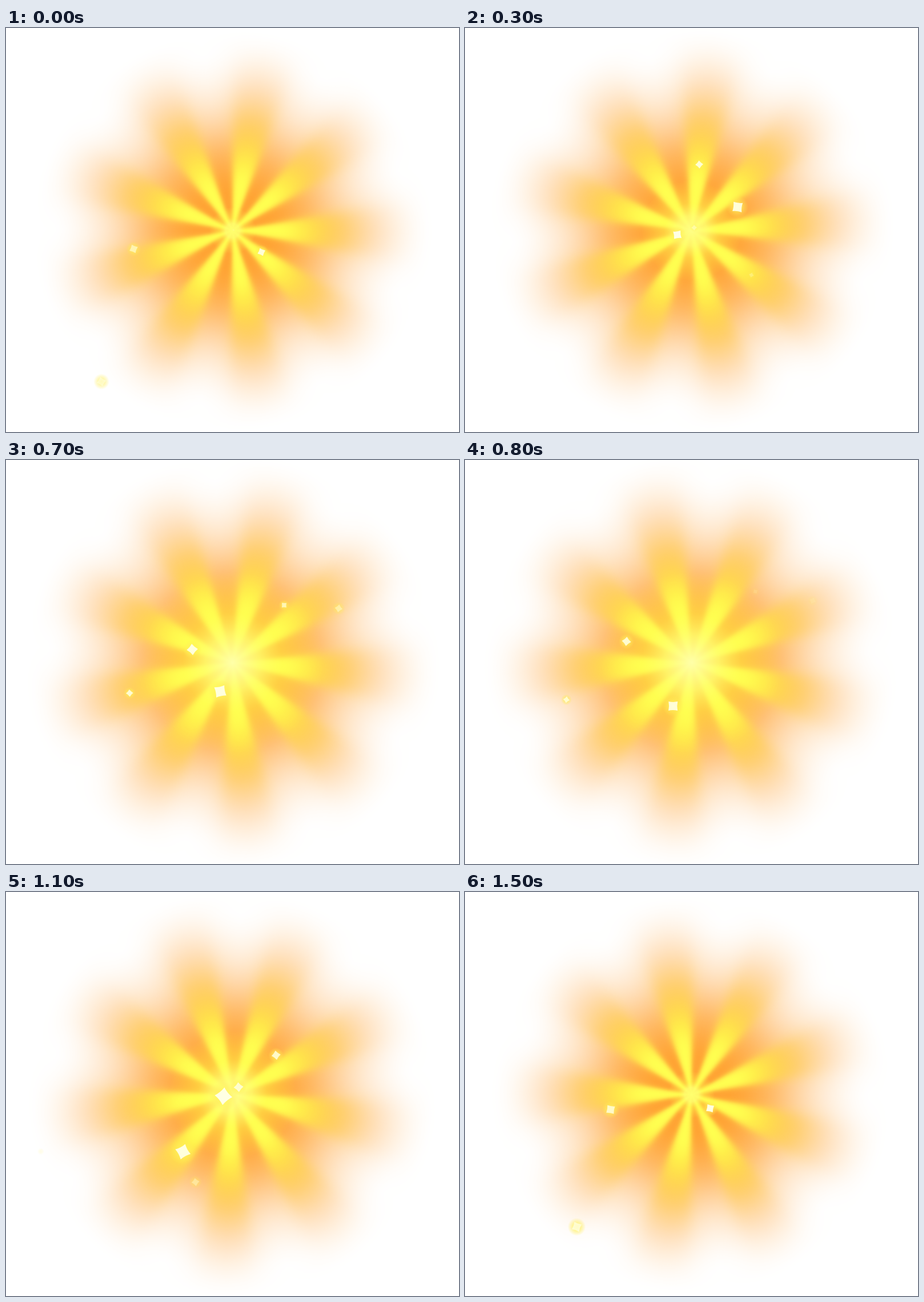
Recreate the animation shown at these times as an HTML page with a canvas. Size 793 by 706 pixels, loop 1600 ms.

```html
<!DOCTYPE html>
<html lang="en">
<head>
<meta charset="utf-8">
<title>Sunburst</title>
<style>
  html, body { margin: 0; width: 100%; height: 100%; overflow: hidden; background: #fff; }
  canvas { display: block; }
</style>
</head>
<body>
<canvas id="stage" width="793" height="706"></canvas>
<script>
const LOOP = 1600, STEP = 100, CX = 396.5, CY = 354;
const ctx = document.getElementById('stage').getContext('2d');

// direction (deg), birth (ms), speed (px/ms), size (px), life (ms)
const sparks = [
  [169.5, 1050, .32, 27, 700],
  [36.5, 1320, .225, 17, 650],
  [131, 796, .435, 29, 1000],
  [-27, -7, .295, 25, 850],
  [-83.3, -2, .385, 17, 620],
  [-48, 278, .32, 19, 550],
  [163.5, 236, .405, 16, 900],
  [-162, 538, .457, 21, 480],
  [113, 503, .278, 26, 700],
  [-42, 798, .34, 22, 500],
  [-51, 1058, .4, 19, 250]
];

const rad = deg => deg * Math.PI / 180;
const mix = (a, b, k) => a + (b - a) * k;
const smooth = (a, b, x) => {
  const k = Math.min(1, Math.max(0, (x - a) / (b - a)));
  return k * k * (3 - 2 * k);
};

// Nine soft rays over an orange glow, painted once
function makeBurst(size) {
  const cv = document.createElement('canvas');
  cv.width = cv.height = size;
  const c = cv.getContext('2d');
  const img = c.createImageData(size, size);
  const sector = rad(40), half = rad(10);
  for (let i = 0, p = 0; i < size * size; i++, p += 4) {
    const x = i % size - size / 2 + .5;
    const y = Math.floor(i / size) - size / 2 + .5;
    const r = Math.hypot(x, y);
    const a = Math.atan2(x, -y) / sector;
    const off = Math.abs(a - Math.round(a)) * sector;
    const ray = 1 / (1 + Math.exp((off - half) * r / (1.6 + r * r / 6000)));

    const rayAlpha = 1 - smooth(105, 355, r);
    const gapAlpha = .97 * (1 - smooth(55, 315, r));
    const cool = smooth(75, 205, r), far = smooth(180, 270, r);
    const pale = smooth(130, 240, r);
    const wr = ray * rayAlpha, wg = (1 - ray) * gapAlpha, sum = wr + wg;
    const k = sum ? wr / sum : 0;

    img.data[p] = 255;
    img.data[p + 1] = mix(mix(160, 172, pale), mix(mix(255, 188, cool), 170, far), k);
    img.data[p + 2] = mix(mix(45, 80, pale), mix(mix(80, 52, cool), 72, far), k);
    img.data[p + 3] = 255 * sum;
  }
  c.putImageData(img, 0, 0);
  return cv;
}

function glow(x, y, r, stops) {
  const g = ctx.createRadialGradient(x, y, 0, x, y, r);
  stops.forEach(([at, color]) => g.addColorStop(at, color));
  ctx.fillStyle = g;
  ctx.fillRect(x - r, y - r, 2 * r, 2 * r);
}

function drawSpark([dir, birth, speed, size, life], i, t) {
  const age = (t - birth + LOOP) % LOOP;
  if (age >= life) return;
  const u = age / life, grow = Math.min(1, age / 50);
  const s = size * grow * (1 - .65 * u), tip = s * .6;
  ctx.save();
  ctx.translate(CX + Math.cos(rad(dir)) * speed * age, CY + Math.sin(rad(dir)) * speed * age);
  ctx.rotate(rad(i * 35 + age * .12));
  ctx.globalAlpha = grow * Math.min(1, 4 * (1 - u));
  glow(0, 0, s, [[0, 'rgba(255,240,90,.85)'], [.45, 'rgba(255,240,90,.6)'], [1, 'rgba(255,235,80,0)']]);
  ctx.fillStyle = `rgba(255,255,228,${1 - .5 * u * u})`;
  ctx.beginPath();
  ctx.moveTo(tip, 0);
  for (let q = 1; q <= 4; q++) {
    const end = q * Math.PI / 2, mid = end - Math.PI / 4;
    ctx.quadraticCurveTo(Math.cos(mid) * tip * .55, Math.sin(mid) * tip * .55,
      Math.cos(end) * tip, Math.sin(end) * tip);
  }
  ctx.fill();
  ctx.restore();
}

const burst = makeBurst(740);

function draw(t) {
  const pulse = (1 - Math.cos(2 * Math.PI * (t + 50) / LOOP)) / 2;
  const scale = 1 + .04 * pulse;
  ctx.fillStyle = '#fff';
  ctx.fillRect(0, 0, 793, 706);

  ctx.save();
  ctx.translate(CX, CY);
  ctx.rotate(rad(10.5 + t * .12));
  ctx.scale(scale, scale);
  ctx.drawImage(burst, -370, -370);
  ctx.restore();

  glow(CX, CY, 40 + 120 * pulse, [
    [0, `rgba(255,255,${Math.round(110 + 60 * pulse)},1)`],
    [.3, 'rgba(255,255,110,.85)'],
    [.55, 'rgba(255,255,80,.45)'],
    [1, 'rgba(255,255,80,0)']
  ]);
  sparks.forEach((s, i) => drawSpark(s, i, t));
}

const start = performance.now();
let shown = -1;
function tick() {
  const t = Math.floor((performance.now() - start) % LOOP / STEP) * STEP;
  if (t !== shown) draw(shown = t);
  requestAnimationFrame(tick);
}
tick();
</script>
</body>
</html>
```
